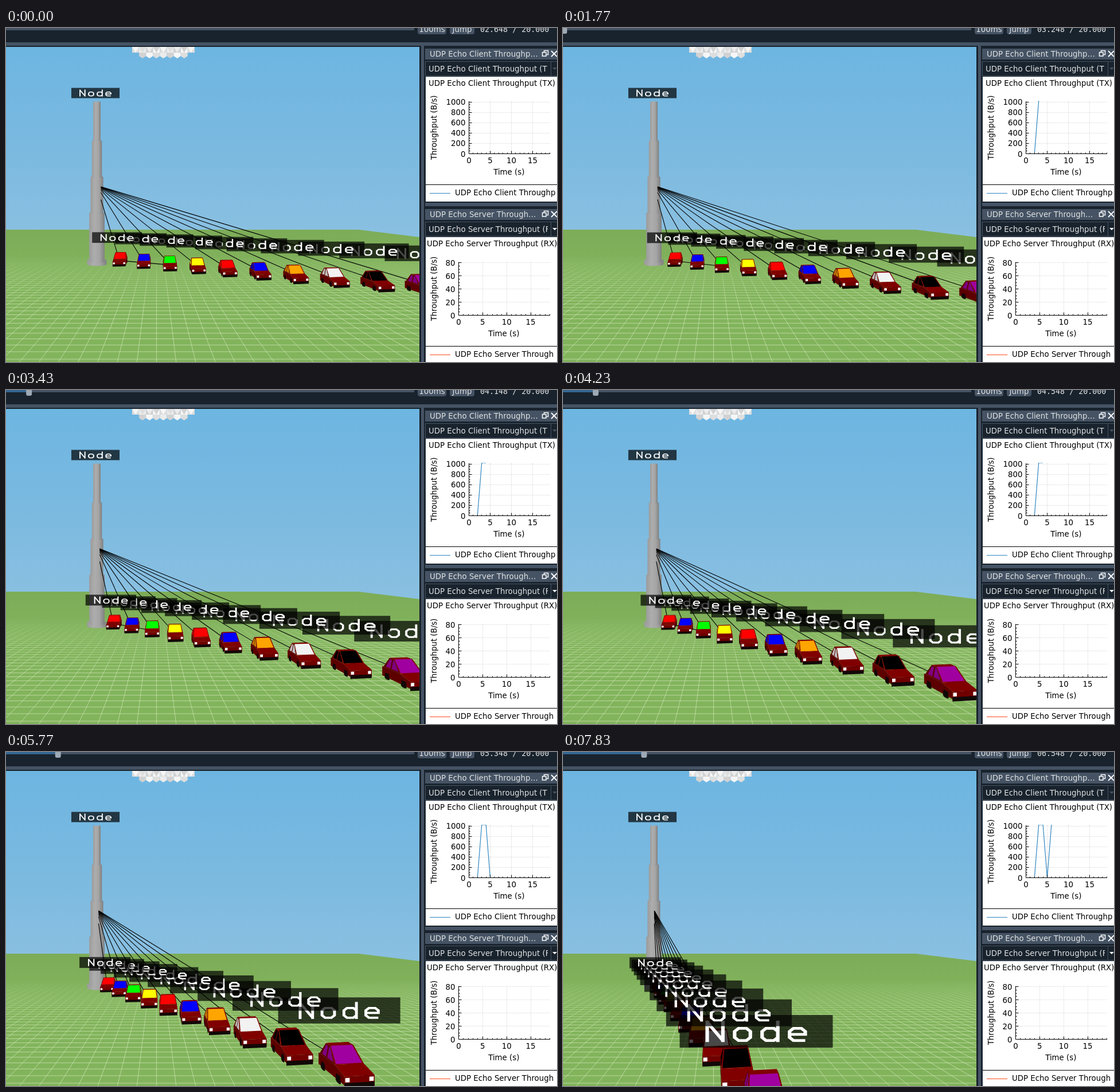
These frames come from a looping animation (961x583 px, 8 s). An HTML page with a canvas:

```html
<!DOCTYPE html>
<html lang="en">
<head>
<meta charset="utf-8">
<title>Network simulation playback</title>
<style>
html, body { margin: 0; width: 100%; height: 100%; overflow: hidden; background: #19232d; }
canvas { display: block; }
</style>
</head>
<body>
<canvas id="stage" width="961" height="583"></canvas>
<script>
const ctx = document.getElementById('stage').getContext('2d');
const LOOP = 8000;
const SANS = '13.33px "DejaVu Sans", sans-serif';
const MONO = '13.33px "DejaVu Sans Mono", monospace';
const DARK = '#19232d', PANEL = '#455364', LIGHT = '#dfe1e2';

// Key points: time (ms), ticks of 0.1 simulated seconds, angle of the row of cars.
const KEYS = [[500, 0, 27.3], [970, 3, 28.8], [2570, 10, 37.1], [3430, 15, 42.3],
  [4230, 19, 46.2], [5170, 25, 51.9], [6500, 31, 59], [7830, 39, 66.7]];
const POINTER = [[500, -30, 90], [970, 493, 439], [1230, 905, 545], [1500, 800, 590]];
const CAR_COLORS = ['red', 'blue', 'lime', 'yellow', 'red', 'blue', 'orange', '#f2f2f2', 'black', '#a000a0'];

const FOCAL = 670, CX = 360, HORIZON = 307, GROUND = 109;
const TOWER = { x: -213.7, z: 709 }, GAP = 53.1;
// The world is turned slightly against the camera; cars and grid share this heading.
const TURN = { sin: .144, cos: .99 };

function keyed(keys, at, from, to) {
  let i = 1;
  while (i < keys.length - 1 && at > keys[i][from]) i++;
  const a = keys[i - 1], b = keys[i];
  const f = Math.min(1, Math.max(0, (at - a[from]) / (b[from] - a[from])));
  return a[to] + (b[to] - a[to]) * f;
}

function project(x, z, down) {
  const s = FOCAL / z;
  return [CX + x * s, HORIZON + down * s];
}

function rect(x, y, w, h, fill) {
  ctx.fillStyle = fill;
  ctx.fillRect(x, y, w, h);
}

function rounded(x, y, w, h, r, fill) {
  ctx.beginPath();
  ctx.roundRect(x, y, w, h, r);
  ctx.fillStyle = fill;
  ctx.fill();
}

function trace(points) {
  ctx.beginPath();
  points.forEach(p => ctx.lineTo(p[0], p[1]));
}

function poly(points, fill) {
  trace(points);
  ctx.closePath();
  ctx.fillStyle = fill;
  ctx.fill();
}

function line(points, color, width = 1) {
  trace(points);
  ctx.strokeStyle = color;
  ctx.lineWidth = width;
  ctx.stroke();
}

function text(str, x, y, color, align = 'left', font = SANS) {
  ctx.font = font;
  ctx.textAlign = align;
  ctx.fillStyle = color;
  ctx.fillText(str, x, y);
}

function clipped(x, y, w, h, draw) {
  ctx.save();
  ctx.beginPath();
  ctx.rect(x, y, w, h);
  ctx.clip();
  draw();
  ctx.restore();
}

function gradient(x0, y0, x1, y1, ...colors) {
  const g = ctx.createLinearGradient(x0, y0, x1, y1);
  colors.forEach((c, i) => g.addColorStop(i / (colors.length - 1), c));
  return g;
}

function drawGround() {
  rect(0, 33, 721, 350, gradient(0, 33, 0, 365, '#6db6e2', '#7ab9e0', '#8ac0e1'));
  poly([[0, 352], [615, 352], [721, 365], [721, 583], [0, 583]],
    gradient(0, 352, 0, 430, '#7dac58', '#82b45c'));
  const ink = gradient(0, 398, 0, 500, 'rgba(220,238,195,0)', 'rgba(220,238,195,.4)', 'rgba(220,238,195,.62)');
  const near = 256, far = 790, cell = 13.5, slant = -TURN.sin / TURN.cos;
  for (let z = near; z < far; z += cell) {
    const y = project(0, z, GROUND)[1];
    line([[0, y], [721, y]], ink);
  }
  for (let m = -26; m < 42; m++) {
    line([far, near].map(z => project(m * cell + slant * z, z, GROUND)), ink);
  }
}

function drawDome() {
  const shade = i => ['#f6f6f6', '#dedede', '#ececec', '#d2d2d2'][i % 4];
  for (let i = 0; i < 9; i++) {
    const x = 220 + i * 12.1, mid = x + 6, end = x + 12.1;
    poly([[x, 33], [end, 33], [end, 43], [x, 43]], shade(i + 1));
    poly([[x, 33], [end, 33], [mid, 43]], shade(i));
    if (i > 0 && i < 8) poly([[x, 43], [end, 43], [end, 49], [mid, 53], [x, 49]], shade(i + 2));
  }
}

function drawTower() {
  const mid = 158.5;
  const section = (half, top, bottom) => {
    ctx.beginPath();
    ctx.ellipse(mid, bottom, half, half * .2, 0, 0, Math.PI);
    ctx.ellipse(mid, top, half, half * .12, 0, Math.PI, 2 * Math.PI);
    ctx.closePath();
    ctx.fillStyle = gradient(mid - half, 0, mid + half, 0, '#9b9b9b', '#adadad', '#a4a4a4', '#808080');
    ctx.fill();
  };
  section(17, 405, 412);
  for (let i = 3; i >= 0; i--) {
    section(6.5 + 2.3 * i, i ? 134 + 63 * i : 129, i < 3 ? 197 + 63 * i : 408);
  }
}

// Car space: u forward, v to the viewer's right, h above the ground.
function drawCar({ x, z }, color) {
  const L = 21, W = 11, BELT = 11, ROOF = 21;
  const at = (u, v, h) => project(x + 1 + u * TURN.sin + v * TURN.cos, z + 5 - u * TURN.cos + v * TURN.sin, GROUND - h);
  const face = (pts, fill) => poly(pts.map(p => at(...p)), fill);
  const across = (u0, w0, h0, u1, w1, h1, fill) =>
    face([[u0, -w0, h0], [u0, w0, h0], [u1, w1, h1], [u1, -w1, h1]], fill);
  const body = '#800000', shade = '#5c0000', black = '#120808';

  for (const side of [1, -1]) {
    const panel = (pts, fill) =>
      face(pts.map(([u, h]) => [u, side * (W - Math.max(0, h - BELT) * .2), h]), fill);
    panel([[-L, 2], [L, 2], [L, 8], [7, BELT], [-L, BELT]], shade);
    panel([[-19, BELT], [-12, ROOF], [-4, ROOF], [7, BELT]], shade);
    for (const glass of [[[-15, 12], [-11, 20], [-8, 20], [-8, 12]], [[-6, 12], [-6, 20], [-4, 20], [4, 12]]]) {
      panel(glass, color);
      panel(glass, 'rgba(0,0,0,.2)');
    }
    for (const u of [-13, 12]) {
      panel([[u - 4, 1], [u - 2, 0], [u + 2, 0], [u + 4, 1], [u + 3, 6], [u - 3, 6]], black);
    }
  }
  across(-12, 9, ROOF, -4, 9, ROOF, body);
  across(-4, 9, ROOF, 7, W, BELT, body);
  across(-5, 8.4, ROOF, 6.5, 10, BELT + .4, color);
  across(7, W, BELT, L, W, 8, body);
  across(L, W, 8, L, W, 1, '#700000');
  across(L, W, 3.5, L, W, 0, black);
  for (const v of [-8.8, 8.8]) {
    face([[L, v - 1.6, 7], [L, v + 1.6, 7], [L, v + 1.6, 4], [L, v - 1.6, 4]], '#fff');
  }
}

// Strokes of the block letters N, o, d, e in a 5 by 7 cell.
const LETTERS = [
  'M.5 7V0M.5 .5L4.5 6.5M4.5 7V0',
  'M1.5 2.5H3.5L4.5 3.5V5.5L3.5 6.5H1.5L.5 5.5V3.5Z',
  'M4.5 0V7M4.5 3.5L3.5 2.5H1.5L.5 3.5V5.5L1.5 6.5H3.5L4.5 5.5',
  'M.5 4.5H4.5V3.5L3.5 2.5H1.5L.5 3.5V5.5L1.5 6.5H4.5'
].map(d => new Path2D(d));

function drawLabel(x, y, scale) {
  const w = 89 * scale, h = 19 * scale;
  rect(x - w / 2, y - h / 2, w, h, 'rgba(0,0,0,.7)');
  ctx.save();
  ctx.translate(x, y);
  ctx.scale(2.28 * scale, 1.78 * scale);
  ctx.translate(-13, -3.5);
  ctx.strokeStyle = '#fff';
  ctx.lineWidth = .9;
  for (const letter of LETTERS) {
    ctx.stroke(letter);
    ctx.translate(7, 0);
  }
  ctx.restore();
}

function drawScene(tick) {
  const angle = keyed(KEYS, tick, 1, 2) * Math.PI / 180;
  const along = d => ({ x: TOWER.x + d * Math.cos(angle), z: TOWER.z - d * Math.sin(angle) });
  const cars = CAR_COLORS.map((c, i) => along((i + 1) * GAP));

  drawGround();
  drawDome();
  drawTower();

  const radius = 10.5, start = along(radius), top = -34, hub = GROUND - 11;
  cars.forEach((car, i) => {
    const exit = top + (hub - top) * radius / ((i + 1) * GAP);
    line([project(start.x, start.z, exit), project(car.x, car.z, hub)], '#000', 1.1);
  });
  line([cars[0], cars[2]].map(c => project(c.x, c.z, 101)), '#000', 1.1);
  cars.forEach((car, i) => drawCar(car, CAR_COLORS[i]));
  for (const car of [...cars].reverse()) {
    const [x, y] = project(car.x - 4, car.z + 2, 60.2);
    drawLabel(x, y, FOCAL / (car.z + 2));
  }
  drawLabel(156, 113.5, FOCAL / TOWER.z);
}

function drawPointer(t) {
  if (t <= 500 || t > 1500) return;
  const x = keyed(POINTER, t, 0, 1), y = keyed(POINTER, t, 0, 2);
  const shape = [[0, 0], [42, 24], [26, 27], [36, 37], [26, 42], [17, 31], [3, 36]].map(([a, b]) => [x + a, y + b]);
  poly(shape, '#000');
  line([...shape, shape[0], shape[1]], '#fff', 2.5);
}

function drawToolbar(tick) {
  const handle = 14 + 4.22 * (tick - 10);
  rect(0, 0, 712, 4, PANEL);
  rect(0, 0, Math.max(0, handle), 4, '#346792');
  rounded(handle, -4, 10, 14, 3, '#9da9b5');
  for (const [x, w, name] of [[718, 50, '100ms'], [774, 43, 'Jump']]) {
    rounded(x, -10, w, 21, 4, PANEL);
    text(name, x + w / 2, 7, LIGHT, 'center');
  }
  const clock = (2.648 + tick / 10).toFixed(3).padStart(6, '0');
  text(clock + ' / 20.000', 827, 7, LIGHT, 'left', MONO);
  rect(0, 25, 961, 6, PANEL);
}

function drawDock(y, title, combo, arrow) {
  rect(731, y, 230, 19, PANEL);
  text(title, 739, y + 14, LIGHT);
  ctx.strokeStyle = '#fff';
  ctx.lineWidth = 1.5;
  ctx.strokeRect(938.5, y + 3.5, 7, 7);
  rect(935, y + 6, 8, 8, PANEL);
  ctx.strokeRect(935.5, y + 6.5, 6.5, 6.5);
  line([[951, y + 4], [961, y + 14]], '#fff', 1.8);
  line([[951, y + 14], [961, y + 4]], '#fff', 1.8);
  ctx.strokeStyle = PANEL;
  ctx.lineWidth = 1;
  ctx.strokeRect(731.5, y + 22.5, 240, 25);
  clipped(732, y + 22, 213, 26, () => text(combo, 737, y + 40, LIGHT));
  line([[950.5, y + 23], [950.5, y + 47]], PANEL);
  poly([[953, y + 33], [961, y + 33], [957, y + 37]], arrow);
  rect(732, y + 49, 229, 218, '#fff');
}

function drawChart(c) {
  const X = v => c.x0 + v * c.xs, Y = v => c.y0 - v * c.ys;
  const crisp = v => Math.floor(v) + .5;
  const right = 949, top = Y(c.max) - 1, steps = 4;
  text(c.title, c.titleX, c.titleY, '#000');

  ctx.setLineDash([1, 2]);
  for (const v of [5, 10, 15]) line([[crisp(X(v)), top], [crisp(X(v)), c.y0]], '#c4c4c4');
  for (let v = c.step; v <= c.max; v += c.step) line([[c.x0, crisp(Y(v))], [right, crisp(Y(v))]], '#c4c4c4');
  ctx.setLineDash([]);

  clipped(c.x0, top - 1, right - c.x0, c.y0 - top + 1, () =>
    line(c.data.map(([a, b]) => [X(a), Y(b)]), c.color, 1.2));
  line([[c.x0, top], [c.x0, c.y0], [right, c.y0]], '#000');
  for (let v = 0; v <= 19; v++) {
    const x = crisp(X(v)), big = v % 5 === 0;
    line([[x, c.y0], [x, c.y0 - (big ? 5 : 2)]], '#000');
    if (big) text(v, X(v), c.y0 + 16, '#000', 'center');
  }
  const sub = c.step / steps;
  for (let i = 0; i * sub <= c.max; i++) {
    const y = crisp(Y(i * sub)), big = i % steps === 0;
    line([[c.x0, y], [c.x0 + (big ? 5 : 2), y]], '#000');
    if (big) text(i * sub, c.x0 - 6, Y(i * sub) + 5, '#000', 'right');
  }
  text('Time (s)', (c.x0 + right) / 2 - 1, c.y0 + 36, '#000', 'center');
  ctx.save();
  ctx.translate(751, (top + c.y0) / 2);
  ctx.rotate(-Math.PI / 2);
  text('Throughput (B/s)', 0, 0, '#000', 'center');
  ctx.restore();

  line([[732, c.legendY + .5], [961, c.legendY + .5]], '#000');
  line([[739, c.legendY + 15.5], [775, c.legendY + 15.5]], c.color);
  text(c.legend, 783, c.legendY + 19, '#000');
}

function drawPanels(tick) {
  const now = 2.648 + tick / 10;
  rect(721, 31, 240, 552, DARK);
  rect(724, 25, 5, 558, PANEL);
  rect(731, 305, 230, 6, PANEL);
  drawDock(36, 'UDP Echo Client Throughp…', 'UDP Echo Client Throughput (T', PANEL);
  drawDock(316, 'UDP Echo Server Through…', 'UDP Echo Server Throughput (RX)', '#fff');
  drawChart({
    title: 'UDP Echo Client Throughput (TX)', titleX: 737, titleY: 101,
    x0: 807.5, xs: 7.4, y0: 219.5, ys: .0905, max: 1000, step: 200,
    data: [[2, 0], [3, 1024], [4, 1024], [5, 0], [6, 1024]].filter(p => p[0] <= now),
    color: '#2f86c0', legend: 'UDP Echo Client Throughp', legendY: 273
  });
  drawChart({
    title: 'UDP Echo Server Throughput (RX)', titleX: 734, titleY: 381,
    x0: 789.5, xs: 8.37, y0: 501.5, ys: 1.15, max: 80, step: 20,
    data: [], color: '#ff4a1c', legend: 'UDP Echo Server Through', legendY: 555
  });
  rect(731, 303, 230, 2, DARK);
}

function render(now) {
  const t = now % LOOP;
  const tick = Math.floor(keyed(KEYS, t, 0, 1) + .01);
  rect(0, 0, 961, 583, DARK);
  drawToolbar(tick);
  drawPanels(tick);
  clipped(0, 33, 721, 550, () => drawScene(tick));
  drawPointer(t);
}

const began = performance.now();
function frame() {
  render(performance.now() - began);
  requestAnimationFrame(frame);
}
frame();
</script>
</body>
</html>
```
